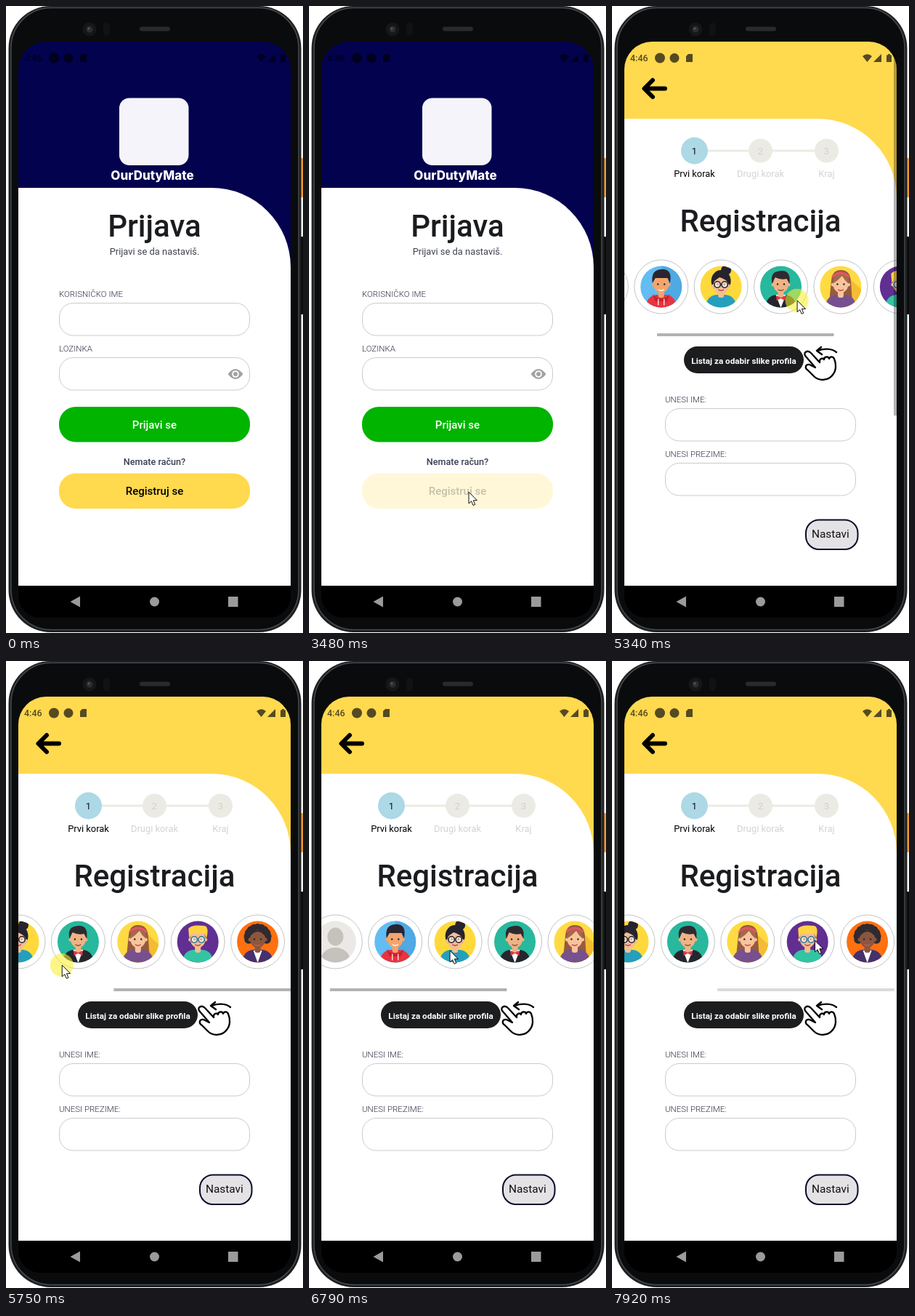
An HTML page with a canvas for the animation above (7.99 s loop, 409 by 862 pixels).

```html
<!DOCTYPE html>
<html lang="sr">
<head>
<meta charset="utf-8">
<title>Registracija</title>
<style>
  html, body { margin: 0; width: 100%; height: 100%; overflow: hidden; background: #fff; }
  canvas { display: block; width: 409px; height: 862px; }
</style>
</head>
<body>
<canvas id="stage"></canvas>
<script>
const W = 409, H = 862, LOOP = 7990;
const NAVY = '#02024f', YELLOW = '#ffd94e', PALE = '#ebebe4', INK = '#1a1c1f';
const canvas = document.getElementById('stage');
const dpr = window.devicePixelRatio || 1;
canvas.width = W * dpr;
canvas.height = H * dpr;
const c = canvas.getContext('2d');

// Keyframes: [time, ...values]
const cursorKeys = [
  [590, 412, 435], [900, 250, 500], [1150, 102, 547], [1360, 125, 505],
  [1430, 129, 500], [1830, 129, 500], [2110, 278.5, 587.5], [2350, 262, 638],
  [2600, 217, 585], [2670, 208, 578], [3020, 220, 668.5], [3900, 220, 668.5],
  [4360, 224.5, 333.5], [4640, 235, 331], [5000, 330, 395], [5180, 325, 400],
  [5750, 77.5, 418.5], [5950, 22, 415], [6310, 22, 415], [6790, 193.5, 398.5],
  [7070, 355, 390], [7140, 355, 390], [7400, 275, 385], [7570, 279.5, 384.5]
];
const scrollKeys = [
  [5180, 0], [5650, 202.5], [6310, 202.5], [6790, 18.5], [6900, 0],
  [7140, 0], [7400, 150], [7600, 197.5]
];

const clamp = v => Math.max(0, Math.min(1, v));
const ramp = (t, a, b) => clamp((t - a) / (b - a));

function track(keys, t) {
  const i = keys.findIndex(k => k[0] > t);
  if (i === 0) return keys[0].slice(1);
  if (i < 0) return keys[keys.length - 1].slice(1);
  const a = keys[i - 1], b = keys[i], p = ramp(t, a[0], b[0]);
  return a.slice(1).map((v, n) => v + (b[n + 1] - v) * p);
}

function rr(x, y, w, h, r, fill, stroke, lw = 1) {
  c.beginPath();
  c.roundRect(x, y, w, h, r);
  if (fill) { c.fillStyle = fill; c.fill(); }
  if (stroke) { c.strokeStyle = stroke; c.lineWidth = lw; c.stroke(); }
}

function oval(x, y, rx, ry, fill) {
  c.beginPath();
  c.ellipse(x, y, rx, ry, 0, 0, 7);
  c.fillStyle = fill;
  c.fill();
}

const dot = (x, y, r, fill) => oval(x, y, r, r, fill);

function shape(d, fill, stroke, lw = 1) {
  const p = new Path2D(d);
  if (fill) { c.fillStyle = fill; c.fill(p); }
  if (stroke) {
    c.strokeStyle = stroke;
    c.lineWidth = lw;
    c.lineCap = c.lineJoin = 'round';
    c.stroke(p);
  }
}

function text(s, x, y, size, color, weight = 400, align = 'center', family = 'Roboto') {
  c.font = `${weight} ${size}px ${family}, sans-serif`;
  c.textAlign = align;
  c.fillStyle = color;
  c.fillText(s, x, y);
}

function phone() {
  rr(405, 209, 4, 54, 1, '#f29a33');
  rr(405, 317, 4, 107, 1, '#0b0b0b');
  rr(3.5, 0, 403, 861, 58, '#1d1f20');
  rr(7, 2.5, 396, 855, 55, '#0a0b0c', '#46494b', 1.5);
  dot(115, 32, 9.5, '#151617');
  dot(115, 32, 4.5, '#2b2d30');
  dot(114, 31, 1.5, '#54575c');
  rr(134, 23, 9, 18, 4.5, '#111213');
  rr(184, 28.5, 42, 6, 3, '#2a2a2b');
}

function statusBar(color) {
  text('4:46', 25, 76, 12.5, color, 500, 'left');
  dot(66, 71.5, 7, color);
  dot(86, 71.5, 6.5, color);
  shape('M105 66H111V77H102V69Z', color);
  shape('M345 69Q351.5 63.5 358 69L351.5 77Z', color);
  shape('M371 66V77H360Z', color);
  shape('M378 67.5H380V66H383V67.5H385V77H378Z', color);
}

function panel(top, color) {
  c.fillStyle = color;
  c.fillRect(17, 49, 375, top + 62);
  rr(17, top, 375, 797 - top, [0, 109, 0, 0], '#fff');
}

function field(label, y) {
  text(label, 73, y - 8, 11.5, '#2d3045', 300, 'left');
  rr(73.5, y + 0.5, 262, 44.5, 19, '#fff', '#cbcbcb');
}

function button(label, y, fill, color) {
  rr(73, y, 263, 48.5, 23, fill);
  text(label, 204.5, y + 30, 15, color, 500);
}

function login(t) {
  panel(250, NAVY);
  statusBar('#00001f');
  rr(156, 126.5, 95.5, 92.5, 14, '#f4f4fa');
  text('OurDutyMate', 201.5, 239, 17, '#fff', 800, 'center', 'Inter');
  text('Prijava', 204.5, 317, 42, INK, 500);
  text('Prijavi se da nastaviš.', 204.5, 342, 12.9, '#3f4250');
  field('KORISNIČKO IME', 408);
  field('LOZINKA', 483);
  shape('M305.5 506Q316 492 326.5 506Q316 520 305.5 506Z', '#a2a2a2');
  dot(316, 506, 4.8, '#fff');
  dot(316, 506, 3, '#a2a2a2');
  button('Prijavi se', 551, '#00b400', '#fff');
  text('Nemate račun?', 204.5, 631, 12.6, '#3b3f52', 500);
  c.save();
  c.globalAlpha = 1 - 0.78 * ramp(t, 3300, 3480);
  button('Registruj se', 642.4, YELLOW, '#000');
  c.restore();
}

function shoulders(color) {
  shape('M-22 32Q-21 12 -6 11H6Q21 12 22 32Z', color);
}

function face(skin, y = -4) {
  rr(-4, 2, 8, 13, 3, skin);
  oval(0, y, 10.5, 12.5, skin);
  dot(-10.5, y + 1, 2.5, skin);
  dot(10.5, y + 1, 2.5, skin);
}

function features(mouth) {
  dot(-4.5, -3.5, 1.2, '#2a2430');
  dot(4.5, -3.5, 1.2, '#2a2430');
  shape('M-3.5 4Q0 6.5 3.5 4', null, mouth, 1.3);
}

function glasses(color) {
  c.strokeStyle = color;
  c.lineWidth = 1.6;
  for (const x of [-5, 5]) {
    c.beginPath();
    c.arc(x, -3, 4.2, 0, 7);
    c.fillStyle = 'rgba(255,255,255,.55)';
    c.fill();
    c.stroke();
  }
}

const avatars = [
  ['#ebe9e5', () => {
    oval(0, 25, 20, 17, '#c5c2bb');
    oval(0, -7, 11, 12.5, '#c5c2bb');
  }],
  ['#62bdf2', () => {
    shape('M0 -30H30V30H0Z', '#4fa9e3');
    shoulders('#e8343f');
    shape('M-12 10Q0 23 12 10L8 20H-8Z', '#c4222f');
    face('#f5a56b');
    shape('M-12 -5Q-15 -25 3 -24Q16 -23 12 -5L9 -12H-8Z', '#2b2530');
    features('#fff');
    shape('M-4 17V25M4 17V25', null, '#fff', 1.2);
  }],
  ['#ffd93b', () => {
    dot(7, -23, 7, '#25232e');
    oval(0, -8, 13.5, 15, '#25232e');
    shoulders('#259fbd');
    face('#f4bd94', -2);
    shape('M-12 -5Q-9 -18 3 -19Q13 -17 11 -3Q7 -11 -2 -13Q-7 -10 -12 -5Z', '#25232e');
    features('#b93d43');
    glasses('#262430');
  }],
  ['#27b89d', () => {
    shoulders('#25262e');
    shape('M-7 11H7L0 29Z', '#fff');
    face('#efb384');
    shape('M-12 -4Q-15 -19 -5 -21Q10 -25 12 -13V-4L8 -11Q0 -9 -8 -13Z', '#302a30');
    features('#874b40');
    shape('M-6 12L0 15L6 12V19L0 16L-6 19Z', '#e13748');
  }],
  ['#ffda43', () => {
    shape('M5 -18L32 7V32H-8Z', '#f5bc31');
    shape('M-13 -8Q-12 -23 0 -23Q13 -23 14 -8L16 22H-16Z', '#955b3e');
    shoulders('#77508f');
    face('#f8c49c');
    shape('M-11 -4Q-10 -19 1 -18Q12 -18 11 -4Q5 -9 2 -15Q-4 -8 -11 -4Z', '#a5694a');
    shape('M-11 -14Q0 -24 11 -14', null, '#e4546a', 3);
    features('#c73d4e');
  }],
  ['#612e92', () => {
    shoulders('#31c5a4');
    face('#f6bb93');
    shape('M-12 -5L-13 -18Q-9 -24 8 -22Q16 -22 12 -5L9 -11H-8Z', '#ffd343');
    features('#a9473f');
    glasses('#287895');
  }],
  ['#ff7010', () => {
    for (let i = 0; i < 11; i++) {
      const a = Math.PI * (0.9 + i * 0.12);
      dot(Math.cos(a) * 13, -7 + Math.sin(a) * 12, 6, '#302a31');
    }
    shoulders('#45316d');
    shape('M-6 12H6L0 29Z', '#fff');
    face('#8c563e');
    shape('M-10 -8Q0 -20 10 -8L8 -16H-8Z', '#302a31');
    features('#d75756');
  }]
];

function avatar(i, x) {
  const [bg, draw] = avatars[i];
  c.save();
  c.translate(x, 386);
  c.beginPath();
  c.arc(0, 0, 37, 0, 7);
  c.strokeStyle = '#c4c4c6';
  c.lineWidth = 1;
  c.stroke();
  c.beginPath();
  c.arc(0, 0, 28.5, 0, 7);
  c.clip();
  c.fillStyle = bg;
  c.fillRect(-30, -30, 60, 60);
  draw();
  c.restore();
}

function step(n, label, x, active) {
  dot(x, 199, active ? 18.5 : 16.5, active ? '#add8e6' : PALE);
  text(n, x, 204, 13, active ? '#111' : '#d0d0d0');
  text(label, x, 235, 12.9, active ? '#000' : '#d3d3d3');
}

function hand() {
  shape('M286 490L274 477C269 472 262 477 267 482L280 497L272 493C266 492 265 498 270 501' +
    'L278 509C286 517 299 514 304 507C309 501 309 492 306 485C304 481 300 482 299 485' +
    'C298 481 292 482 292 486C290 483 285 485 286 490Z', '#fff', '#000', 2.3);
  shape('M309 476C302 470 291 471 283 474M288 469L282 474L289 479', null, '#000', 2.4);
}

function register(t) {
  panel(155, YELLOW);
  statusBar('#554a22');
  shape('M73 113.5H45M56 102L44.5 113.5L56 125', null, '#000', 6);

  c.fillStyle = PALE;
  c.fillRect(130, 197.5, 60, 3);
  c.fillRect(219, 197.5, 62, 3);
  step('1', 'Prvi korak', 113.5, true);
  step('2', 'Drugi korak', 204.5);
  step('3', 'Kraj', 295.5);
  text('Registracija', 204.5, 310, 42, INK, 500);

  const [scroll] = track(scrollKeys, t);
  avatars.forEach((_, i) => avatar(i, 54.7 + 82.4 * i - scroll));
  c.fillStyle = `rgba(0,0,0,${0.3 - 0.28 * ramp(t, 7800, 8020)})`;
  c.fillRect(17 + scroll * 0.649, 450, 243.5, 4);

  rr(99, 468, 165, 37, 18.5, '#1c1d1f');
  text('Listaj za odabir slike profila', 181.5, 491.5, 11.7, '#fff', 700);
  hand();
  field('UNESI IME:', 553);
  field('UNESI PREZIME:', 628);
  rr(267, 706.5, 71.5, 40.5, 18, '#e4e2e5', '#0b0b2c', 2);
  text('Nastavi', 275, 731, 15.4, '#111', 400, 'left');

  c.fillStyle = `rgba(0,0,0,${0.3 * (1 - ramp(t, 5410, 5550))})`;
  c.fillRect(388, 49, 4, 514);
}

function navBar() {
  c.fillStyle = '#000';
  c.fillRect(17, 797, 375, 44);
  const gray = '#9b9b9b';
  shape('M88.5 819L102 811.5V826.5Z', gray);
  dot(204.5, 819, 6.5, gray);
  c.fillStyle = gray;
  c.fillRect(306, 812, 13.5, 14);
}

function pointer(t) {
  if (t < 590) return;
  const [x, y] = track(cursorKeys, t);
  const pressed = (t > 5100 && t < 6700) || (t > 7140 && t < 7380);
  if (pressed) dot(x - 0.5, y - 0.5, 16, 'rgba(250,240,50,.58)');
  c.save();
  c.translate(x, y);
  shape('M0 0V15.5L3.6 12.2L6 18L8.7 16.9L6.3 11.2H11Z', '#fff', '#111', 1);
  c.restore();
}

function draw(t) {
  c.setTransform(dpr, 0, 0, dpr, 0, 0);
  c.fillStyle = '#fff';
  c.fillRect(0, 0, W, H);
  phone();
  c.save();
  c.beginPath();
  c.roundRect(17, 49, 375, 792, [38, 38, 30, 30]);
  c.clip();
  // The pages cross-fade shortly after the button is tapped.
  const fade = ramp(t, 3800, 4010);
  if (fade < 1) login(t);
  if (fade > 0) {
    c.globalAlpha = fade;
    register(t);
    c.globalAlpha = 1;
  }
  navBar();
  c.restore();
  pointer(t);
}

const start = performance.now();
function tick() {
  draw((performance.now() - start) % LOOP);
  requestAnimationFrame(tick);
}
tick();
</script>
</body>
</html>
```
